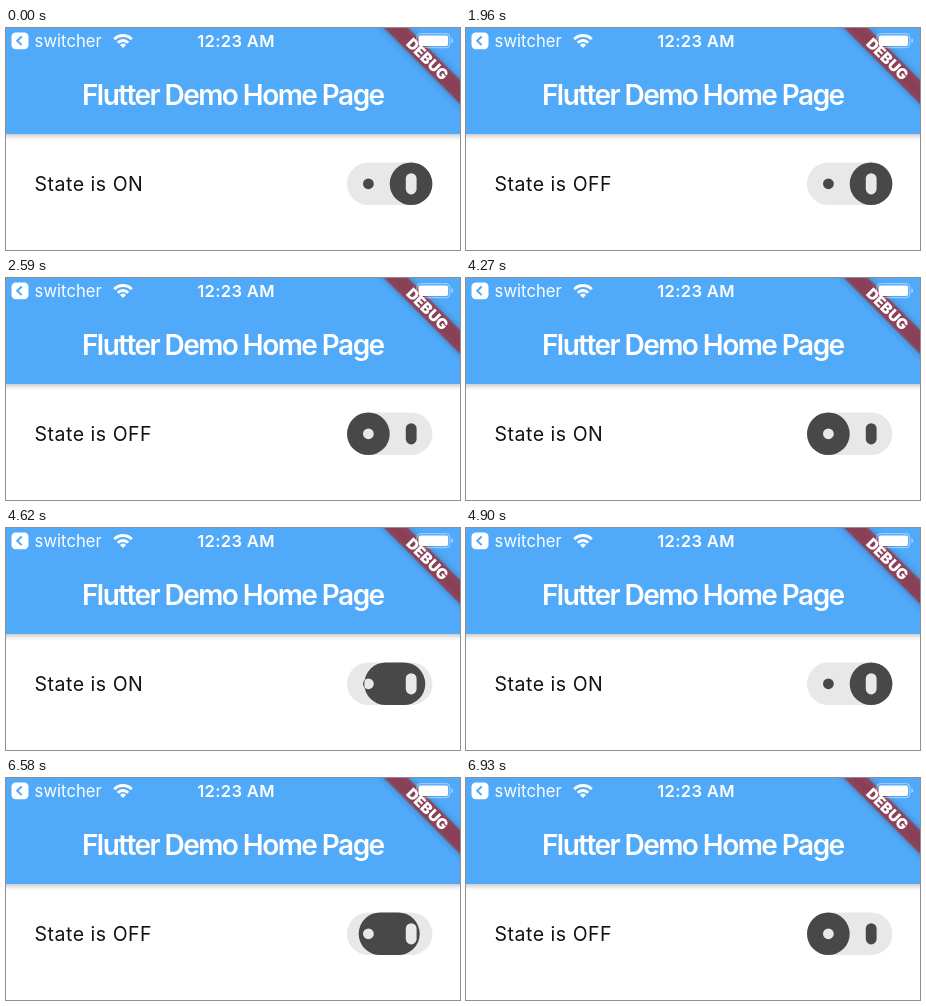
Write an HTML page that moves like this. It is 454 px wide and 222 px high and loops after 8 s.

```html
<!DOCTYPE html>
<html lang="en">
<head>
<meta charset="utf-8">
<title>Switch demo</title>
<style>
  html, body { margin: 0; width: 100%; height: 100%; overflow: hidden; background: #fff; }
  svg { display: block; width: 454px; height: 222px; font-family: Inter, Roboto, sans-serif; }
  .bar { fill: #50a9f9; filter: drop-shadow(0 2px 2.5px rgba(0, 0, 0, .24)); }
  .light { fill: #fff; }
  .ribbon { fill: #b71c1c; fill-opacity: .63; filter: drop-shadow(0 0 3.5px rgba(0, 0, 0, .4)); }
  .wifi { fill: none; stroke: #fff; stroke-width: 3; }
  #state { font-size: 19.5px; letter-spacing: .52px; fill: #111; }
</style>
</head>
<body>
<svg viewBox="0 0 454 222">
  <defs>
    <clipPath id="cover"><rect class="knob" y="134.5" height="42.6" rx="21.3"/></clipPath>
    <g id="icons">
      <circle cx="362.4" cy="155.8" r="5.4"/>
      <rect x="399.8" y="145.2" width="10.8" height="21.2" rx="5.4"/>
    </g>
  </defs>

  <rect class="bar" x="-10" y="-10" width="474" height="116"/>
  <text class="light" x="226.8" y="76.7" text-anchor="middle" font-size="28" font-weight="600" letter-spacing="-1.55">Flutter Demo Home Page</text>

  <rect class="light" x="5.5" y="4.4" width="17" height="16.8" rx="4.2"/>
  <path d="M15.7 8.5l-4.5 4.3 4.5 4.3" fill="none" stroke="#50a9f9" stroke-width="2"/>
  <text class="light" x="28.6" y="18.8" font-size="16.6" letter-spacing=".05">switcher</text>
  <g class="wifi">
    <path d="M108.3 11.2a12.3 12.3 0 0 1 17.4 0"/>
    <path d="M111.8 14.7a7.4 7.4 0 0 1 10.4 0"/>
  </g>
  <path class="light" d="M117 20l-3-3a4.3 4.3 0 0 1 6 0z"/>
  <text class="light" x="230" y="18.8" text-anchor="middle" font-size="16.6" font-weight="600" letter-spacing=".3">12:23 AM</text>

  <g transform="translate(421.3 31.2) rotate(45)">
    <rect class="ribbon" x="-70" y="-8.5" width="140" height="17"/>
    <text class="light" y="5.2" text-anchor="middle" font-size="15" font-weight="900">DEBUG</text>
  </g>
  <rect x="410.8" y="5.7" width="33" height="14" rx="3.5" fill="none" stroke="#fff" stroke-opacity=".5"/>
  <rect class="light" x="412.5" y="7.4" width="29.6" height="10.6" rx="2"/>
  <path class="light" fill-opacity=".5" d="M445.4 10.3a2.5 2.5 0 0 1 0 4.8z"/>

  <text id="state" x="28.5" y="162.7"></text>
  <rect x="341" y="134.5" width="85.4" height="42.6" rx="21.3" fill="#e8e8e8"/>
  <use href="#icons" fill="#484848"/>
  <rect class="knob" y="134.5" height="42.6" rx="21.3" fill="#484848"/>
  <use href="#icons" fill="#e8e8e8" clip-path="url(#cover)"/>
</svg>
<script>
const LOOP = 8000, STEP = 70, SLIDE = 600;
const LEFT = 341, SIZE = 42.7;
const taps = [
  { at: 1960, on: false },
  { at: 4270, on: true },
  { at: 6275, on: false }
];
const knobs = document.querySelectorAll('.knob');
const state = document.getElementById('state');
const clamp = v => Math.min(1, Math.max(0, v));

function draw(ms) {
  const t = Math.floor(ms % LOOP / STEP) * STEP;
  const tap = taps.filter(k => k.at <= t).pop() || { at: -SLIDE, on: true };
  const p = (t - tap.at) / SLIDE;
  // the leading edge runs ahead, so the knob stretches on the way
  const lead = clamp(p / .7), trail = clamp((p - .3) / .7);
  const [a, b] = tap.on ? [trail, lead] : [1 - lead, 1 - trail];
  for (const k of knobs) {
    k.setAttribute('x', LEFT + SIZE * a);
    k.setAttribute('width', SIZE * (1 + b - a));
  }
  state.textContent = 'State is ' + (tap.on ? 'ON' : 'OFF');
}

const start = performance.now();
function tick() {
  draw(performance.now() - start);
  requestAnimationFrame(tick);
}
tick();
</script>
</body>
</html>
```
